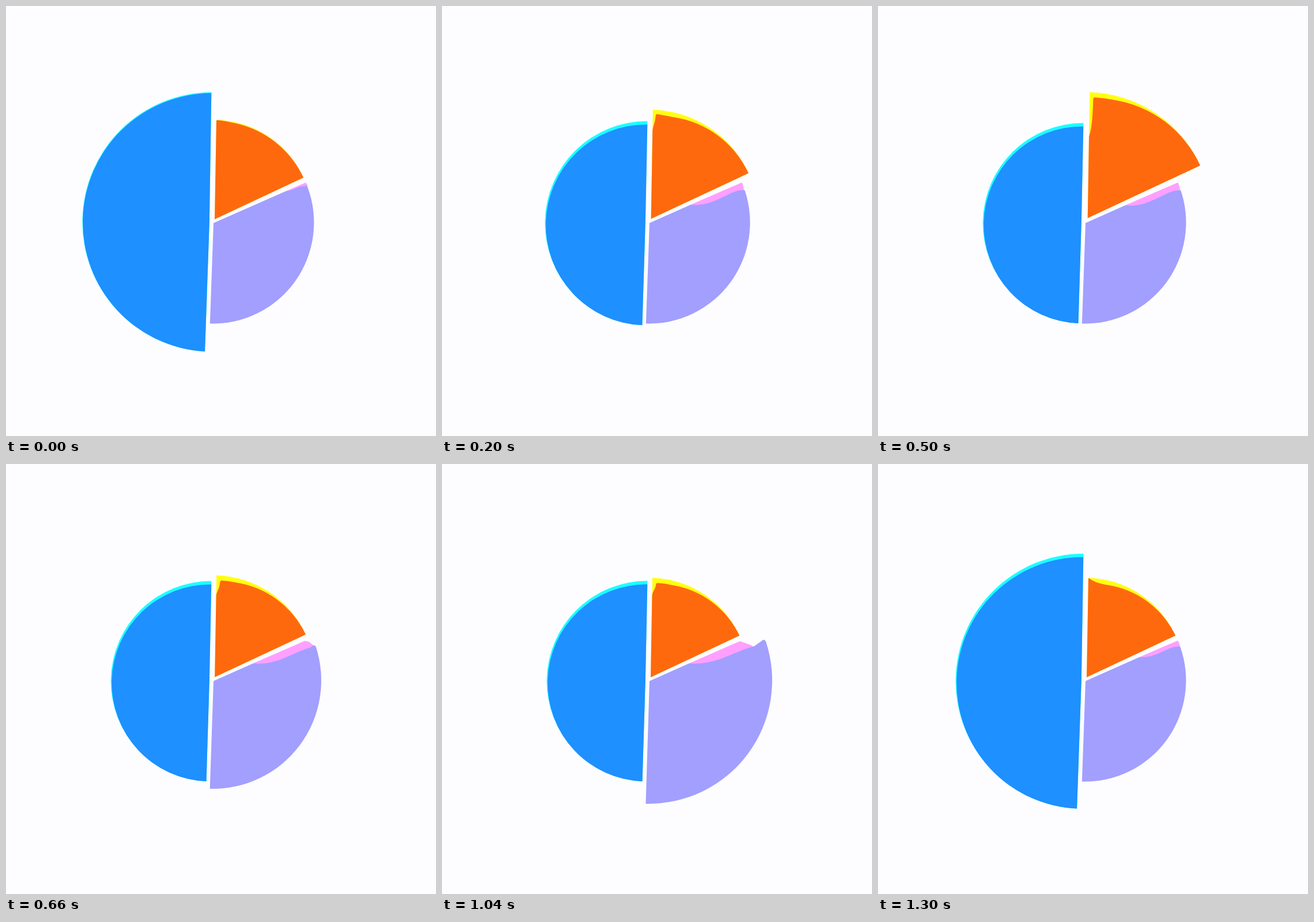
An HTML page for the animation above (1320 ms loop, 748x748 px).

```html
<!DOCTYPE html>
<html lang="en">
<head>
<meta charset="utf-8">
<title>Pulsing pie</title>
<style>
  html, body { margin: 0; width: 100%; height: 100%; overflow: hidden; background: #fdfdff; }
  svg { display: block; width: 100vw; height: 100vh; }
</style>
</head>
<body>
<svg viewBox="0 0 748 748">
  <path id="cyan" fill="#1cffff"/>
  <path id="blue" fill="#1e90ff"/>
  <path id="yellow" fill="#ffff12"/>
  <path id="orange" fill="#ff690e"/>
  <path id="pink" fill="#ff9fff"/>
  <path id="violet" fill="#a29fff"/>
</svg>
<script>
const LOOP = 1320, STEP = 20;
const clamp = v => Math.max(0, Math.min(1, v));
const mix = (a, b, p) => a + (b - a) * p;
const ease = (t, from, to) => (1 - Math.cos(Math.PI * clamp((t - from) / (to - from)))) / 2;
const set = (id, d) => document.getElementById(id).setAttribute("d", d);

// Size of the highlights over the loop: [time, amount]
const shine = [[0, 0], [40, .4], [120, .74], [220, 1], [1060, 1], [1180, .82], [1300, .56], [1320, .5]];

function shineAt(t) {
  const i = shine.findIndex(p => p[0] > t);
  const [t0, a] = shine[i - 1], [t1, b] = shine[i];
  return mix(a, b, (t - t0) / (t1 - t0));
}

// Left half: bow is how far the arc centre lies right of its chord
function half(top, k, bow) {
  const bottom = 552 + 49 * k, bx = 348.5 - 2.5 * k;
  const r = Math.hypot((bottom - top) / 2, (357 - bx) / 2, bow);
  return `M353.8 378L357.3 ${top}A${r} ${r} 0 0 0 ${bx} ${bottom}Z`;
}

function drawBlue(k, h) {
  const c = clamp(h * 2);
  const top = 203.5 - 49 * k - 4.5 * (1 - c);
  const bow = 4 + 1.5 * k + 1.5 * (1 - c);
  set("cyan", half(top, k, bow));
  set("blue", half(top + 1.5 + 4.5 * c, k, bow - 1.5 * c));
}

function drawOrange(k, h) {
  const ax = 363 + 1.7 * k, ay = 371 - 2 * k, r = 173 + 46 * k;
  const left = 366 + 2.3 * k, top = 198 - 48 * k;
  const ex = 517.5 + 43 * k, ey = 298.5 - 21 * k;
  set("yellow", `M${ax} ${ay}L${left} ${top}A${r} ${r} 0 0 1 ${ex} ${ey}Z`);

  const g = clamp(h * 1.8), n = clamp((h - .72) / .28);
  const cy = top + .5 + 8.5 * n, ny = mix(cy + 3, 229, n * n);
  const nx = mix(ax, left, (ay - ny) / (ay - top));
  const ix = left + 6 * n, cx = ix + 1 + 2 * n;
  const depth = r - mix(2, 8.5, g);
  const mx = ax + .214 * depth, my = ay - .977 * depth;
  const ri = mix(171, 157, g) * r / 173;
  set("orange", `M${ax} ${ay}L${nx} ${ny}` +
    `C${nx + n} ${ny - 8 * n} ${ix - 1.5 * n} ${mix(cy + 2, ny - 10, n)} ${ix} ${cy + 2 + 2 * n}` +
    `Q${ix} ${cy} ${cx} ${cy}` +
    `C${cx + 10} ${cy + 7 * (1 - n) * g + .8} ${mx - 12} ${my - 2.5} ${mx} ${my}` +
    `A${ri} ${ri} 0 0 1 ${ex} ${ey}Z`);
}

function drawViolet(k, h) {
  const r = 176 + 49 * k, a = mix(21.6, 19, h) * Math.PI / 180;
  const px = 360 + r * Math.cos(a), py = 376.5 - r * Math.sin(a);
  const sx = 487 - 57 * h, sy = 377 - (sx - 361) * .4375;
  const w = clamp(2 * k);
  const vx = 515 + 28 * w, vy = 314 + 7.5 * h - 4.5 * w, dx = vx - sx;
  const tx = px - 4, ty = py + 1.5 - 3 * k;
  const tip = clamp(k * 3.2), ex = 525.5 + 16 * tip, ey = mix(312, 319, h) - 2 * k;

  set("pink", `M${sx} ${sy}L${520 - 2 * k} ${307.7 + .6 * k}` +
    `Q${522.5 + 5 * tip} ${306.5 + 6 * k} ${mix(523, ex - 6, tip)} ${mix(310, 312 + 3 * k, tip)}` +
    `L${ex} ${ey}L${vx} ${vy + 3}L${sx + dx * .4} ${sy + 4 * h}Z`);
  set("violet", `M361 377.5L${sx} ${sy}` +
    `C${sx + .42 * dx} ${sy + 4 * h} ${sx + .7 * dx} ${vy + 8 * h} ${vx} ${vy}` +
    `L${tx} ${ty}Q${px - 1} ${py - 1.5 * k} ${px + .5} ${py + 2}` +
    `A${r} ${r} 0 0 1 ${354.8 - .5 * k} ${552.5 + 48.8 * k}Z`);
}

function draw(t) {
  const h = shineAt(t);
  drawBlue(t < 500 ? 1 - ease(t, 50, 230) : ease(t, 1030, 1335), h);
  drawOrange(ease(t, 74, 379) - ease(t, 515, 695), h);
  drawViolet(ease(t, 557, 862) - ease(t, 985, 1165), h);
}

const start = performance.now();
function tick() {
  const t = (performance.now() - start) % LOOP;
  draw(Math.floor(t / STEP) * STEP);
  requestAnimationFrame(tick);
}
tick();
</script>
</body>
</html>
```
